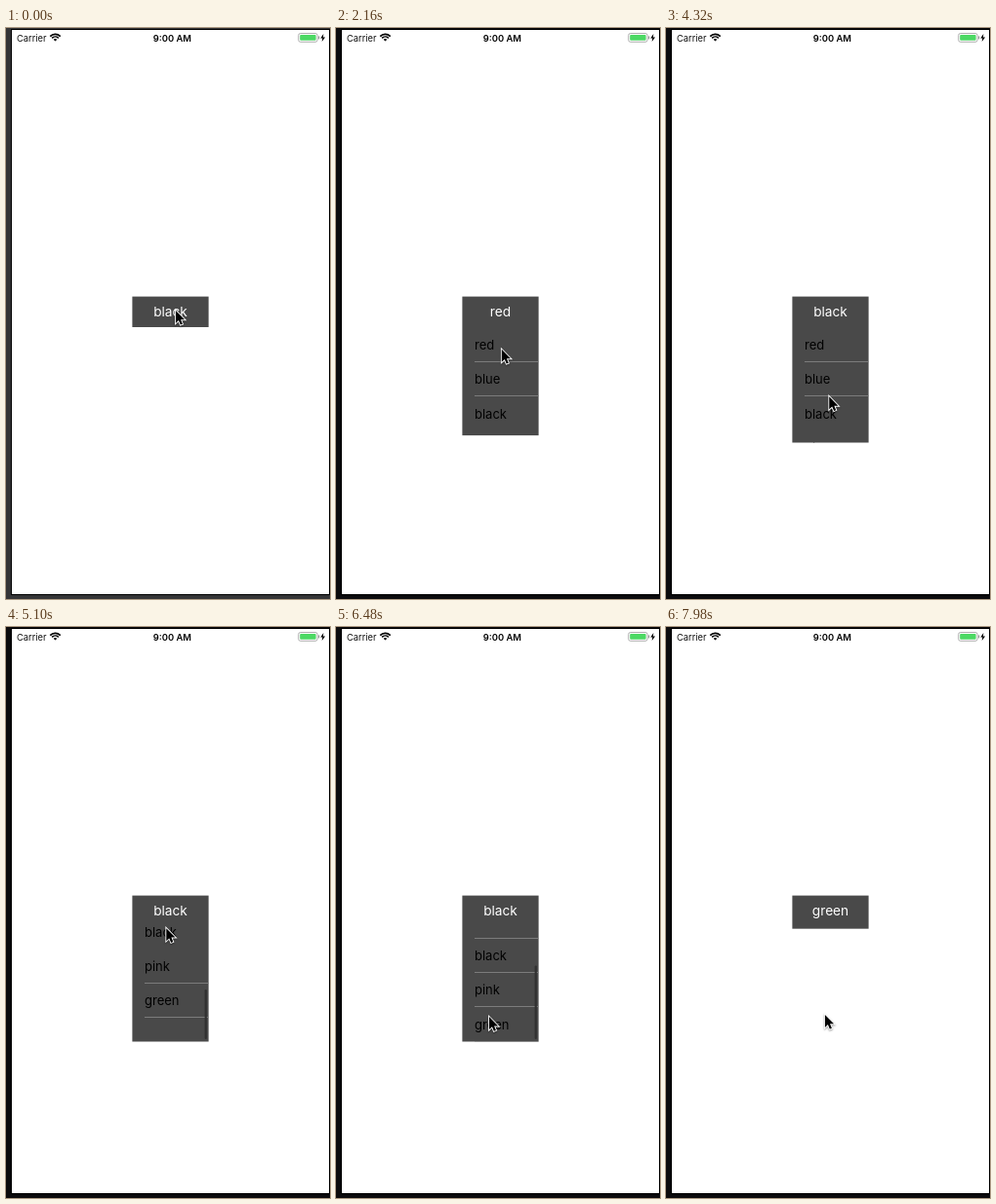
These frames come from a looping animation (332x586 px, 8 s). An HTML page with a canvas:

```html
<!DOCTYPE html>
<html lang="en">
<head>
<meta charset="utf-8">
<style>
html, body { margin: 0; width: 332px; height: 586px; overflow: hidden; background: #0b0b0d; }
canvas { display: block; }
</style>
</head>
<body>
<canvas id="stage" width="332" height="586"></canvas>
<script>
const ctx = document.getElementById('stage').getContext('2d');
const LOOP = 8000;
const BOX = { x: 129.4, y: 275.6, w: 78.2, bar: 31.4, list: 118.5 };
const LIST_Y = BOX.y + BOX.bar;
const ROW = 35.3;
const ROWS = ['red', 'blue', 'black', 'pink', 'green'];
const MAX_SCROLL = ROW * ROWS.length - BOX.list;
const SPRING = 112;

const SESSIONS = [
  { start: 60, end: 1080, pick: 'red' },
  { start: 1980, end: 2920, pick: 'black' },
  { start: 3900, end: 7879, pick: 'green' }
];

const DRAGS = [{ grab: 4640, release: 5640 }, { grab: 6450, release: 6860 }];

// Pointer glides: start time, end time, destination; it rests in between
const HOME = [173, 289];
const GLIDES = [
  [180, 840, 156, 329],
  [1350, 1740, 170, 291],
  [1980, 2500, 166, 427],
  [2560, 2860, 164, 395],
  [3060, 3540, 169, 286],
  [3900, 4590, 165, 424],
  [4640, 5280, 163, 281],
  [5640, 6120, 156, 400],
  [6450, 6860, 160.5, 350],
  [6860, 7475, 162, 397]
];

const clamp = v => Math.max(0, Math.min(1, v));
const smooth = p => p * p * (3 - 2 * p);

function pointer(t) {
  let [x, y] = HOME;
  for (const [start, end, toX, toY] of GLIDES) {
    const e = smooth(clamp((t - start) / (end - start)));
    x += (toX - x) * e;
    y += (toY - y) * e;
  }
  return [x, y];
}

function menu(t) {
  let title = 'black', open = 0;
  for (const { start, end, pick } of SESSIONS) {
    if (t >= end) {
      title = pick;
      open = (1 - clamp((t - end) / 120)) ** 2;
    } else if (t >= start) {
      open = 1 - (1 - clamp((t - start) / 300)) ** 3;
    }
  }
  return { title, open };
}

// Dragging past the end is damped; on release the list springs back
function scrollAt(t) {
  let offset = 0;
  for (const { grab, release } of DRAGS) {
    if (t < grab) break;
    const raw = offset + pointer(grab)[1] - pointer(Math.min(t, release))[1];
    const over = Math.max(0, raw - MAX_SCROLL);
    const stretch = BOX.list * (1 - 1 / (over * 0.55 / BOX.list + 1));
    const decay = Math.exp(-Math.max(0, t - release) / SPRING);
    offset = Math.max(0, Math.min(raw, MAX_SCROLL)) + stretch * decay;
  }
  return offset;
}

function rect(color, x, y, w, h) {
  ctx.fillStyle = color;
  ctx.fillRect(x, y, w, h);
}

function pill(color, x, y, w, h, r) {
  ctx.fillStyle = color;
  ctx.beginPath();
  ctx.roundRect(x, y, w, h, r);
  ctx.fill();
}

function text(str, x, y, font, color, align = 'left') {
  ctx.font = font + ' Inter, Roboto, sans-serif';
  ctx.fillStyle = color;
  ctx.textAlign = align;
  ctx.fillText(str, x, y);
}

function polygon(points, x, y) {
  ctx.beginPath();
  points.forEach(([px, py]) => ctx.lineTo(x + px, y + py));
  ctx.closePath();
}

function drawWifi(x, y) {
  ctx.strokeStyle = '#000';
  for (const [r, width] of [[7.2, 1.7], [4.6, 1.7], [1.3, 2.5]]) {
    ctx.lineWidth = width;
    ctx.beginPath();
    ctx.arc(x, y, r, -Math.PI * 0.76, -Math.PI * 0.24);
    ctx.stroke();
  }
}

function drawBattery() {
  ctx.strokeStyle = '#9a9a9a';
  ctx.lineWidth = 0.8;
  ctx.beginPath();
  ctx.roundRect(299.7, 5.5, 19.4, 8.8, 2);
  ctx.stroke();
  pill('#4cd964', 301.2, 7, 16.4, 5.8, 1);
  rect('#9a9a9a', 320, 8.4, 1.2, 3);
  polygon([[3, 0], [0, 4.6], [2, 4.6], [1.4, 8], [4.8, 3.4], [2.7, 3.4]], 322.3, 6);
  ctx.fillStyle = '#000';
  ctx.fill();
}

function drawStatus() {
  text('Carrier', 11, 13.5, '9.3px', '#111');
  text('9:00 AM', 170.3, 13.5, '600 9.4px', '#000', 'center');
  drawWifi(50.5, 13.6);
  drawBattery();
}

function drawRows(offset) {
  ROWS.forEach((name, i) => {
    const y = LIST_Y + ROW * i - offset;
    const line = y + ROW;
    text(name, 142, y + 23, '13px', '#000');
    // A hairline falling between two pixel rows is not drawn
    if (line % 1 < 0.78) rect('#7c7c7c', 142, Math.floor(line), 65.6, 1);
  });
}

function drawScrollBar(t, offset) {
  const length = 76 - Math.max(0, offset - MAX_SCROLL);
  const top = LIST_Y + 2 + Math.min(1, offset / MAX_SCROLL) * (114 - length);
  ctx.globalAlpha = 1 - clamp((t - 7360) / 250);
  pill('#303030', 203.6, top, 2.2, length, 1.1);
}

function drawMenu(t) {
  const { title, open } = menu(t);
  const height = BOX.list * open;
  rect('#494949', BOX.x, BOX.y, BOX.w, BOX.bar + height);
  text(title, 168.5, 296.4, '13.7px', '#fff', 'center');

  const offset = scrollAt(t);
  ctx.save();
  ctx.beginPath();
  ctx.rect(BOX.x, LIST_Y, BOX.w, height);
  ctx.clip();
  drawRows(offset);
  if (offset) drawScrollBar(t, offset);
  ctx.restore();
}

function drawPointer(t) {
  const [x, y] = pointer(t);
  polygon([[0, 0], [0, 13], [3, 10.2], [4.9, 14.7], [7, 13.8], [5.1, 9.4], [9.2, 9.4]], x + 0.9, y + 0.9);
  ctx.save();
  ctx.shadowColor = 'rgba(0,0,0,.4)';
  ctx.shadowBlur = 2;
  ctx.shadowOffsetY = 1;
  ctx.strokeStyle = '#fff';
  ctx.lineWidth = 1.8;
  ctx.stroke();
  ctx.restore();
  ctx.fillStyle = '#000';
  ctx.fill();
}

function draw(now) {
  const t = now % LOOP;
  rect(t < 60 ? '#353537' : '#0b0b0d', 0, 0, 332, 586);
  rect('#000', 5, 1, 327, 581);
  rect('#fff', 6, 2, 325, 579);
  drawStatus();
  drawMenu(t);
  drawPointer(t);
  requestAnimationFrame(draw);
}
requestAnimationFrame(draw);
</script>
</body>
</html>
```
